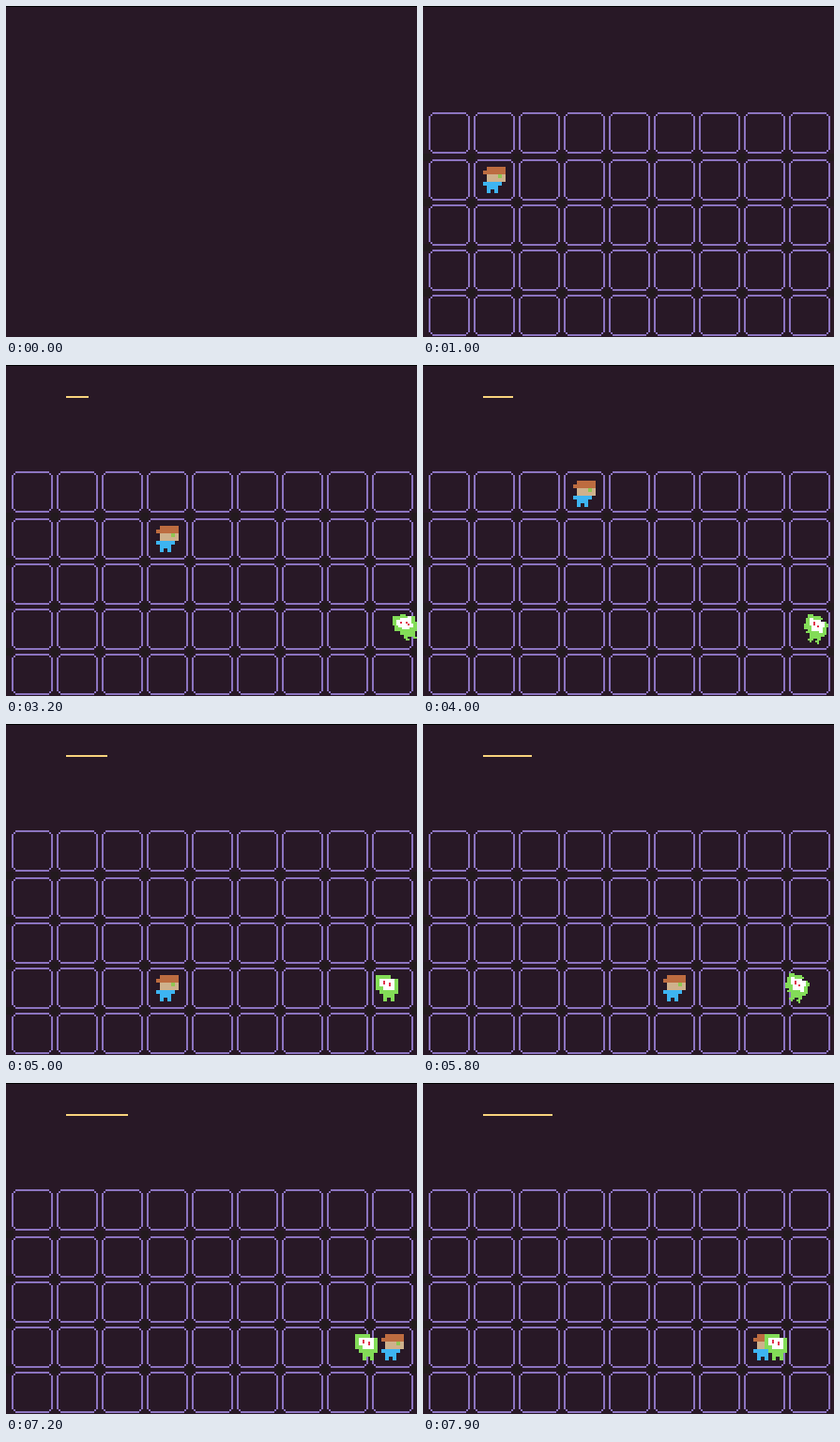
An HTML page with a canvas for the animation above (8 s loop, 438 by 352 pixels).

```html
<!DOCTYPE html>
<html>
<head>
<meta charset="utf-8">
<style>
  html, body { margin: 0; width: 100%; height: 100%; overflow: hidden; background: #281826; }
  canvas { display: block; }
</style>
</head>
<body>
<canvas id="stage" width="438" height="352"></canvas>
<script>
const ctx = document.getElementById('stage').getContext('2d');
const LOOP = 8000, START = 900;
const COLS = 9, ROW_TOPS = [56, 81, 105, 129, 153];
const BACK = '#281826', LINE = '#8c74c0', BAR = '#f8d37c', SHADE = '#221a1e';

const COLORS = {
  H: '#bd6c40', S: '#cfb18c', E: '#8fc653', B: '#3db4f2',
  G: '#83dc58', W: '#ffffff', R: '#e0344c'
};
const HERO = [
  '.HHHHH',
  'HHHHHH',
  '.SSSES',
  '.SSSSS',
  'BBBBB.',
  '.BBB..',
  '.B.B..'
];
const ZOMBIE = [
  'GGGGGGGG....',
  'GGGGGGGG....',
  'GGWWWWWWWWGG',
  'GGWWRWWWWWGG',
  'GGWWRWWRWWGG',
  'GGWWWWWRWWGG',
  'GGGGWWWWWWGG',
  'GGGGWWWWWWGG',
  '..GGGGGGGGGG',
  '..GGGGGGGGGG',
  '....GGGGGG..',
  '....GGGGGG..',
  '....GG..GG..',
  '....GG..GG..'
];
// [time, column, row] of each hop
const HOPS = [
  [900, 1, 1], [1800, 2, 1], [2700, 3, 1], [3600, 3, 0],
  [4100, 3, 1], [4300, 3, 2], [4500, 3, 3], [4600, 3, 4], [4900, 3, 3],
  [5500, 4, 3], [5700, 5, 3], [5900, 6, 3], [6200, 7, 3],
  [6900, 8, 3], [7400, 7, 3]
];

// All coordinates below are in art pixels, two stage pixels wide.
function rect(color, x, y, w, h) {
  ctx.fillStyle = color;
  ctx.fillRect(x, y, w, h);
}

function drawCell(x, y) {
  for (const far of [0, 21]) {
    rect(LINE, x + 2, y + far, 18, 1);
    rect(LINE, x + far, y + 2, 1, 18);
  }
  for (const dx of [1, 20])
    for (const dy of [1, 20]) rect(LINE, x + dx, y + dy, 1, 1);
}

function drawGrid() {
  for (const top of ROW_TOPS.slice(1))
    for (let c = 0; c <= COLS; c++) rect(SHADE, c * 24, top - 3, 4, 4);
  for (const top of ROW_TOPS)
    for (let c = 0; c < COLS; c++) drawCell(3 + c * 24, top);
}

// Nearest-neighbour rotation keeps the sprite on the pixel grid.
function drawSprite(sprite, left, top, scale, angle = 0) {
  const w = sprite[0].length * scale, h = sprite.length * scale;
  const cos = Math.cos(angle), sin = Math.sin(angle);
  for (let y = -3; y < h + 3; y++) {
    for (let x = -3; x < w + 3; x++) {
      const dx = x + .5 - w / 2, dy = y + .5 - h / 2;
      const sx = Math.floor((dx * cos + dy * sin + w / 2) / scale);
      const sy = Math.floor((dy * cos - dx * sin + h / 2) / scale);
      const color = COLORS[sprite[sy]?.[sx]];
      if (color) rect(color, left + x, top + y, 1, 1);
    }
  }
}

function draw(time) {
  const t = Math.floor(time / 100) * 100;
  ctx.setTransform(1, 0, 0, 1, 0, 0);
  rect(BACK, 0, 0, 438, 352);
  rect('#000', 0, 0, 438, 1);
  if (t < START) return;

  ctx.setTransform(2, 0, 0, 2, 0, 1);
  const steps = Math.floor((t - 864) / 188);
  rect(BAR, 32, 16, steps, 1);
  drawGrid();

  const [, col, row] = HOPS.findLast(hop => hop[0] <= t);
  drawSprite(HERO, 8 + col * 24, 61 + row * 24, 2);

  const sway = Math.sin(2 * Math.PI * ((t - 3200) * .0021 + .18));
  const tilt = Math.abs(sway) > .5 ? Math.sign(sway) : 0;
  if (t >= 1300)
    drawSprite(ZOMBIE, 219 - steps, 133 - (tilt > 0 ? 1 : 0), 1, -.26 * tilt);
}

function frame() {
  draw(performance.now() % LOOP);
  requestAnimationFrame(frame);
}
frame();
</script>
</body>
</html>
```
